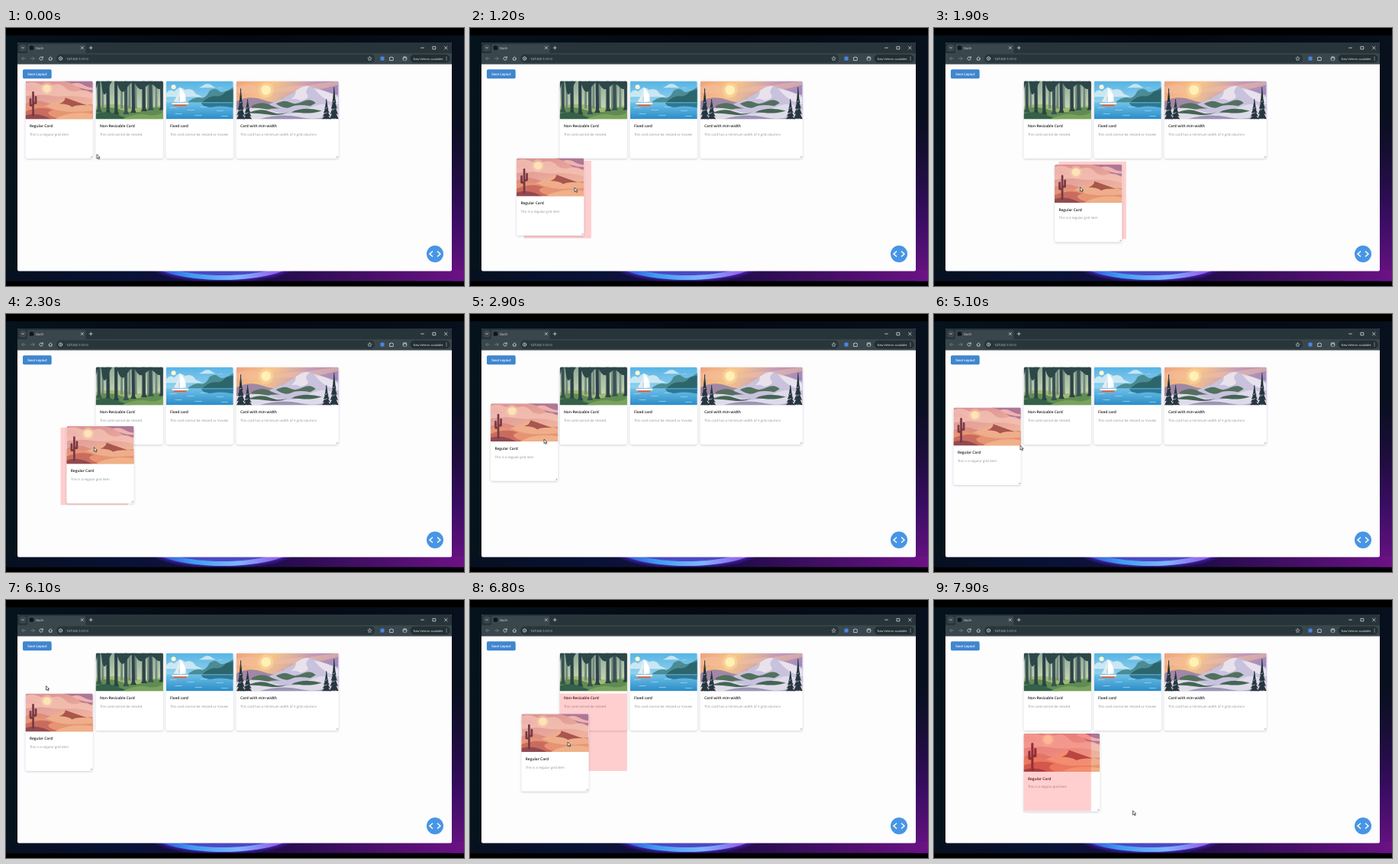
An HTML page for the animation above (8 s loop, 600 px wide and 338 px high).

```html
<!DOCTYPE html>
<html lang="en">
<head>
<meta charset="utf-8">
<title>Dash grid layout</title>
<style>
html, body { margin: 0; width: 100%; height: 100%; overflow: hidden; background: #000; }
#stage { display: block; width: 100vw; height: 100vh; }
text { font-family: "Open Sans", "Noto Sans", sans-serif; text-rendering: geometricPrecision; }
.title { font-size: 4.9px; font-weight: 600; fill: #1c1c20; }
.note { font-size: 4.37px; fill: #8d9196; }
.bar { font-size: 4.2px; fill: #e6eaeb; }
.icon { fill: none; stroke: #d5dbdd; stroke-width: .8; stroke-linecap: round; stroke-linejoin: round; }
</style>
</head>
<body>
<svg id="stage" viewBox="0 0 600 338" preserveAspectRatio="none">
  <defs>
    <linearGradient id="wall" x2="1" y2="0">
      <stop offset="0" stop-color="#05131d"/><stop offset=".5" stop-color="#050812"/><stop offset="1" stop-color="#07101c"/>
    </linearGradient>
    <linearGradient id="side" x2="0" y2="1">
      <stop offset=".3" stop-color="#250a4a" stop-opacity="0"/><stop offset=".75" stop-color="#3a0d63"/><stop offset="1" stop-color="#6a1283"/>
    </linearGradient>
    <linearGradient id="floor">
      <stop offset="0" stop-color="#06101f"/><stop offset=".28" stop-color="#0a1238"/><stop offset=".55" stop-color="#1c0b45"/><stop offset="1" stop-color="#6b1285"/>
    </linearGradient>
    <linearGradient id="arc">
      <stop offset="0" stop-color="#3c2bd0"/><stop offset=".3" stop-color="#3f9cf0"/><stop offset=".6" stop-color="#7fb4ff"/><stop offset="1" stop-color="#a032dd"/>
    </linearGradient>
    <linearGradient id="desertSky" x2=".5" y2="1">
      <stop offset="0" stop-color="#d98f93"/><stop offset="1" stop-color="#f3b9a0"/>
    </linearGradient>
    <linearGradient id="lakeSky" x2="0" y2="1">
      <stop offset="0" stop-color="#55b3e4"/><stop offset="1" stop-color="#c5e8f3"/>
    </linearGradient>
    <linearGradient id="lakeWater" x2="0" y2="1">
      <stop offset="0" stop-color="#6fc3e8"/><stop offset="1" stop-color="#2b8bc7"/>
    </linearGradient>
    <linearGradient id="forestAir" x2="0" y2="1">
      <stop offset="0" stop-color="#8fa999"/><stop offset="1" stop-color="#d9e7b8"/>
    </linearGradient>
    <linearGradient id="snowSky" x2="1" y2=".25">
      <stop offset="0" stop-color="#eda37e"/><stop offset=".35" stop-color="#f6c58a"/><stop offset=".7" stop-color="#c79cb7"/><stop offset="1" stop-color="#a18abb"/>
    </linearGradient>
    <filter id="soft" x="-20%" y="-20%" width="140%" height="140%"><feGaussianBlur stdDeviation="1.5"/></filter>
    <filter id="glow" x="-20%" y="-100%" width="140%" height="300%"><feGaussianBlur stdDeviation="2"/></filter>
  </defs>

  <rect width="600" height="338" fill="#000"/>
  <rect y="9.5" width="600" height="322" fill="url(#wall)"/>
  <rect x="584" y="9.5" width="16" height="322" fill="url(#side)"/>
  <rect y="317" width="600" height="14.5" fill="url(#floor)"/>
  <svg y="317" width="600" height="14.5" viewBox="0 317 600 14.5">
    <ellipse cx="284" cy="300" rx="104" ry="32" fill="#4426b8" filter="url(#glow)"/>
    <ellipse cx="284" cy="300" rx="100" ry="30" fill="url(#arc)"/>
    <ellipse cx="284" cy="297" rx="92" ry="27" fill="#4b49c4"/>
  </svg>

  <rect x="15" y="19" width="569" height="299.5" rx="2" fill="#fdfdfe"/>
  <path d="M15 47.5V21q0-2 2-2H582q2 0 2 2V47.5Z" fill="#39474c"/>
  <path d="M15 33V21q0-2 2-2H582q2 0 2 2V33Z" fill="#27343a"/>
  <path d="M26 33.2q2 0 2-2V23q0-2 2-2H102.5q2 0 2 2v8.2q0 2 2 2Z" fill="#39474c"/>
  <rect x="17.5" y="21.5" width="9" height="9" rx="2.5" fill="#3a484e"/>
  <circle cx="33.5" cy="26" r="2.9" fill="#11171b"/>
  <rect x="66" y="34.5" width="417" height="11" rx="5.5" fill="#28353a"/>
  <rect x="529.5" y="34.8" width="52" height="10.4" rx="5.2" fill="#232e33"/>
  <rect x="490.5" y="37.5" width="5" height="5" rx=".6" fill="#4b86e0"/>
  <circle cx="522.5" cy="40" r="3" fill="#9aa8ad"/>
  <circle cx="522.5" cy="40.8" r="1.6" fill="#39474c"/>
  <g class="icon">
    <path d="M20.7 25.3l1.3 1.4 1.3-1.4M98.3 24.5l3 3m0-3l-3 3M109.2 26h4M111.2 24v4"/>
    <path d="M543.5 26h4M574.5 24.2l3.6 3.6m0-3.6l-3.6 3.6"/>
    <rect x="559.3" y="24.3" width="3.5" height="3.5"/>
    <path d="M25.3 40h-4.5m2-2l-2 2 2 2M32.7 40h4.5m-2-2l2 2-2 2" stroke="#788589"/>
    <path d="M47.9 38.7a2.2 2.2 0 1 0 .3 2M48.3 37.5v1.6h-1.6M56 40l2.3-2.2 2.3 2.2M56.7 39.8v2.3h3.2v-2.3"/>
    <circle cx="71.5" cy="40" r="2.2"/><path d="M71.5 39.9v1M71.5 38.9v.1"/>
    <path d="M476.5 37.5l.8 1.7 1.8.2-1.3 1.3.3 1.8-1.6-.9-1.6.9.3-1.8-1.3-1.3 1.8-.2Z" stroke-width=".6"/>
    <path d="M503 38.5h1.3q.5-1.8 1.4 0h1.4v1.3q1.7.6 0 1.4v1.3H503Z"/>
    <path d="M577 38v.1M577 40v.1M577 42v.1" stroke-width="1"/>
  </g>
  <text class="bar" x="39" y="27.6">Dash</text>
  <text class="bar" x="79" y="41.6" style="font-size:4.3px">127.0.0.1<tspan fill="#93a0a5">:8050</tspan></text>
  <text class="bar" x="533.5" y="41.5" style="font-size:3.9px">New Velmor available</text>

  <rect x="22" y="54.3" width="37.7" height="11.9" rx="1.6" fill="#4086cf"/>
  <text x="40.9" y="61.9" text-anchor="middle" fill="#fff" font-size="4.4" font-weight="600">Save Layout</text>

  <g id="cards"></g>
  <rect id="slot" width="88.3" height="101.5" fill="#f00" opacity=".19"/>

  <circle cx="562" cy="296" r="11" fill="#4795e4"/>
  <path d="M559 292.5l-4 3.5 4 3.5M565 292.5l4 3.5-4 3.5" fill="none" stroke="#fff" stroke-width="1.5"/>
  <path id="arrow" d="M0 0V5.6L1.4 4.4 2.4 6.5 3.4 6 2.4 4H4.2Z" fill="#fff" stroke="#222" stroke-width=".7"/>
  <path id="resizer" d="M-3-3h2.8L-1.1-1.9 1.9 1.1 3 .2V3H.2L1.1 1.9-1.9-1.1-3-.2Z" fill="#fff" stroke="#222" stroke-width=".7"/>
</svg>
<script>
const byId = id => document.getElementById(id);
const shape = (d, fill, extra = "") => `<path d="${d}" fill="${fill}" ${extra}/>`;
const disc = (x, y, r, fill, extra = "") => `<circle cx="${x}" cy="${y}" r="${r}" fill="${fill}" ${extra}/>`;
const box = (w, h, fill, y = 0) => `<rect y="${y}" width="${w}" height="${h}" fill="${fill}"/>`;

function desert() {
  const cactus = "M10 45V15M10 32H6.5V24M10 29H13.5V21";
  return box(88, 50, "url(#desertSky)")
    + shape("M48 0H88V15Q76 15 70 9T48 0Z", "#ad7898")
    + shape("M0 3Q10 0 18 4T36 5 52 9 70 13 88 18V24Q70 19 56 20T30 19 0 20Z", "#f4c3b4", 'opacity=".75"')
    + shape("M0 8Q6 4 12 9T25 13H0ZM60 4Q68 1 75 5T88 9V12Q74 12 60 4Z", "#f0b2ad")
    + disc(28, 10, 8, "#f9cfae", 'opacity=".5"') + disc(28, 10, 5.3, "#fde3b5")
    + shape("M0 30Q14 23 26 28T46 29L88 31V50H0Z", "#dc8d7e")
    + shape("M22 34Q42 27 52 22Q66 27 88 33V50H22Z", "#efae8b")
    + shape("M52 22Q66 27 80 32Q68 31 61 34Q55 30 44 30Q52 27 52 22Z", "#a9564f")
    + shape("M0 33Q18 29 35 36T88 39V50H0Z", "#e69474")
    + shape("M0 40Q20 32 36 38Q27 40 31 44T50 50H0Z", "#c96c5e")
    + shape("M38 50Q58 38 88 43V50Z", "#f0b088")
    + shape("M0 45Q12 41 25 46L34 50H0Z", "#914a50")
    + `<path d="${cactus}" fill="none" stroke="#783943" stroke-width="2.7" stroke-linecap="round" stroke-linejoin="round"/>`;
}

function forest() {
  let art = box(88, 50, "url(#forestAir)")
    + shape("M0 33Q22 28 44 33T88 31V50H0Z", "#9dba70");
  for (let i = 0; i < 13; i++) {
    const x = 3 + i * 7 + 2 * Math.sin(i * 5);
    art += shape(`M${x} 0h2.2l.5 36h-3.2Z`, "#71887e");
  }
  art += shape("M0 37Q16 32 34 38T64 38 88 36V50H0Z", "#5f8c53");
  for (let i = 0; i < 8; i++) {
    const x = 2 + i * 11.5 + 2 * Math.sin(i * 3), foot = 41 + 3 * Math.sin(i * 7);
    art += shape(`M${x} 0h4l.4 ${foot - 4}l2 4h-8l1.8-4Z`, i % 3 ? "#2f4147" : "#3a5154");
  }
  return art
    + shape("M0 0H88V9Q82 13 77 7T65 8 53 6 41 9 29 6 17 9 8 8 0 12Z", "#2c4748")
    + shape("M0 43Q14 38 28 44T52 50H0Z", "#35604a")
    + shape("M34 50Q54 41 66 44T88 41V50Z", "#79a35c");
}

function lake() {
  const waves = [[5, 35], [28, 38], [45, 34], [66, 39], [12, 43], [38, 45], [72, 46]]
    .map(([x, y]) => `M${x} ${y}h9`).join("");
  return box(88, 50, "url(#lakeSky)")
    + shape("M0 17Q5 9 11 14Q18 5 25 12Q34 8 39 17L48 21H0ZM47 7Q54 1 60 6T75 9H43Z", "#e5f3f6", 'opacity=".75"')
    + disc(10, 8, 3, "#fff7d5")
    + shape("M28 28Q38 20 45 22T57 13Q64 8 69 13T88 8V30H28Z", "#4b8b93")
    + shape("M46 29Q57 19 65 20T78 14L88 11V31H46Z", "#2d656d")
    + box(88, 22, "url(#lakeWater)", 28)
    + shape("M46 29H88V35Q72 32 61 34T46 29Z", "#2c7895")
    + `<path d="${waves}" stroke="#a9dff0" stroke-width=".7"/>`
    + shape("M18 8Q27 16 26 27L18 28Z", "#fff") + shape("M17 11V28L10 27Q15 20 17 11Z", "#e2edf1")
    + shape("M7 29L30 28.5Q28 33 25 33H11Z", "#f5f5f0") + shape("M8.5 31H28.5L26 33H11Z", "#c95b4d");
}

function pine(x, top, height) {
  let d = "";
  for (let i = 0; i < 5; i++) {
    const y = top + i * height / 6, half = 1.6 + i * 1.2;
    d += `M${x} ${y}L${x + half} ${y + height / 3}Q${x} ${y + height / 4} ${x - half} ${y + height / 3}Z`;
  }
  return shape(d, "#27363f") + shape(`M${x - .5} ${top}h1v${height}h-1Z`, "#27363f")
    + `<path d="M${x - 2} ${top + height * .45}l3-1M${x - 3} ${top + height * .7}l4-1.5" stroke="#b9bed0" stroke-width=".8"/>`;
}

function snow() {
  return box(134, 50, "url(#snowSky)")
    + shape("M0 8Q18 2 31 8T58 10 85 6 112 3L134 0V5Q104 14 76 14T34 16 0 15Z", "#f5c2a2", 'opacity=".5"')
    + disc(39, 12, 10, "#ffe1a0", 'opacity=".4"') + disc(39, 12, 6.3, "#fff0b5")
    + shape("M0 27Q18 18 36 25T61 22L75 27V50H0Z", "#a187a6")
    + shape("M44 30Q66 22 78 13Q88 5 96 7T118 14L134 19V50H44Z", "#c8c2dc")
    + shape("M78 13Q88 5 96 7Q89 13 93 18T84 26Q80 22 72 24Q79 18 78 13ZM102 10Q119 13 134 22V31Q115 27 102 10Z", "#e9e2ec")
    + shape("M52 30Q63 24 70 28T87 27 104 29L97 33Q80 30 72 34T52 30ZM20 33Q33 26 43 31T59 36Q42 36 32 39T20 33Z", "#52705e")
    + shape("M0 38Q28 32 50 40T95 36 134 38V50H0Z", "#dedbe8")
    + shape("M16 42Q31 35 44 40T68 41Q57 46 43 44T16 42ZM72 41Q88 33 112 39Q98 43 88 42T72 41Z", "#456553")
    + shape("M30 50Q58 42 82 47T116 46L126 50Z", "#9b94b6")
    + pine(6, 10, 42) + pine(15, 24, 27) + pine(128, 8, 43) + pine(118, 24, 27);
}

function addCard(name, title, note, art, artWidth, resizable) {
  const handle = resizable ? '<path class="handle" d="M-1.5-3.2V-1.7H-3" fill="none" stroke="#777" stroke-width=".6"/>' : "";
  byId("cards").insertAdjacentHTML("beforeend", `<g id="${name}">
    <clipPath id="${name}Clip"><rect class="wide tall" rx="2.3"/></clipPath>
    <rect class="wide tall" y=".9" rx="2.3" fill="#15202c" opacity=".2" filter="url(#soft)"/>
    <rect class="wide tall" rx="2.3" fill="#fff"/>
    <g clip-path="url(#${name}Clip)"><svg class="wide" height="49.7" viewBox="0 0 ${artWidth} 50"
      preserveAspectRatio="xMidYMid slice">${art}</svg></g>
    <text class="title" x="5.4" y="60.7">${title}</text>
    <text class="note" x="5.4" y="71.3">${note}</text>${handle}</g>`);
}

function placeCard(name, x, y, w, h) {
  const card = byId(name);
  card.setAttribute("transform", `translate(${x} ${y})`);
  card.querySelectorAll(".wide").forEach(el => el.setAttribute("width", w));
  card.querySelectorAll(".tall").forEach(el => el.setAttribute("height", h));
  card.querySelector(".handle")?.setAttribute("transform", `translate(${w} ${h})`);
}

addCard("fixedSize", "Non-Resizable Card", "This card cannot be resized", forest(), 88, false);
addCard("fixed", "Fixed card", "This card cannot be resized or moved", lake(), 88, false);
addCard("wideCard", "Card with min-width", "This card has a minimum width of 3 grid columns", snow(), 134, true);
byId("cards").append(byId("slot"));
addCard("regular", "Regular Card", "This is a regular grid item", desert(), 88, true);
const W = 88.3, H = 101.5;
placeCard("fixedSize", 117.5, 69.5, W, H);
placeCard("fixed", 209.5, 69.5, W, H);
placeCard("wideCard", 301.5, 69.5, 134.3, H);

// Tracks: time followed by values, interpolated linearly.
const cardPos = [
  [900, 25.5, 69.5], [1000, 33, 95], [1100, 46, 140], [1200, 61, 170.5], [1400, 118, 178],
  [1600, 176, 180], [1800, 168, 180], [1900, 158, 179], [2100, 118, 168], [2400, 60, 136],
  [2700, 29, 112], [2800, 28.5, 112], [3000, 25.5, 122.5], [6400, 25.5, 122.5],
  [6700, 52, 140], [7000, 98, 168], [7200, 115, 176], [7300, 117.5, 175]
];
const cardSize = [
  [3500, W, H], [3600, 95, 106], [3900, 128, 117], [4200, 145.5, 122.5], [4400, 146, 123],
  [4600, W, H], [7800, W, H], [7900, 99.7, 102]
];
const slotPos = [
  [1000, 25.5, 69.5], [1100, 25.5, 150], [1200, 70.5, 174], [1300, 117.5, 175], [1500, 117.5, 175],
  [1700, 188, 175], [1800, 168, 175], [1900, 163.5, 175], [2000, 117.5, 175], [2200, 117.5, 175],
  [2400, 25.5, 122.5], [6600, 25.5, 122.5], [6800, 117.5, 122.5], [6900, 117.5, 175]
];
const pointer = [
  [0, 119, 165.5], [300, 112, 150], [700, 82, 108], [900, 82, 107], [1000, 100, 132], [1100, 118, 175],
  [1200, 137, 209], [1400, 188, 216], [1600, 230, 217], [1800, 207, 214], [1900, 191.5, 208.5],
  [2100, 150, 196], [2400, 98, 164], [2700, 80, 148], [2800, 82, 151], [2900, 97, 164],
  [3300, 112, 221], [3500, 114, 223], [3900, 154, 239], [4200, 170, 243], [4500, 171, 243],
  [5000, 125, 185], [5500, 65, 122], [6100, 52.5, 112.5], [6300, 74, 154], [6400, 81, 159],
  [6700, 115, 177], [7000, 154, 204], [7200, 170, 212], [7700, 204, 274], [7800, 220, 276], [7900, 260.5, 276]
];

function sample(track, t) {
  const next = track.findIndex(key => key[0] > t);
  if (next < 0) return track.at(-1).slice(1);
  const b = track[next], a = track[Math.max(0, next - 1)];
  const p = a === b ? 0 : (t - a[0]) / (b[0] - a[0]);
  return a.slice(1).map((v, i) => v + (b[i + 1] - v) * p);
}

const within = (t, from, to) => t >= from && t < to;
const show = (el, on) => el.setAttribute("visibility", on ? "visible" : "hidden");
const moveTo = (el, [x, y]) => el.setAttribute("transform", `translate(${x} ${y})`);

function draw(t) {
  const slot = byId("slot"), cards = byId("cards");
  const sizing = within(t, 3500, 4500) || t >= 7800;
  placeCard("regular", ...sample(cardPos, t), ...sample(cardSize, t));
  moveTo(slot, sample(slotPos, t));
  show(slot, sizing || within(t, 1000, 2800) || within(t, 6500, 7200));
  cards.insertBefore(slot, sizing ? null : byId("regular"));

  const diagonal = within(t, 3300, 4600);
  const spot = sample(pointer, t);
  moveTo(byId("arrow"), spot);
  moveTo(byId("resizer"), spot);
  show(byId("arrow"), !diagonal);
  show(byId("resizer"), diagonal);
}

const LOOP = 8000, STEP = 100;
let start;
function tick(now) {
  start ??= now;
  draw(Math.floor((now - start) % LOOP / STEP) * STEP);
  requestAnimationFrame(tick);
}
draw(0);
requestAnimationFrame(tick);
</script>
</body>
</html>
```
